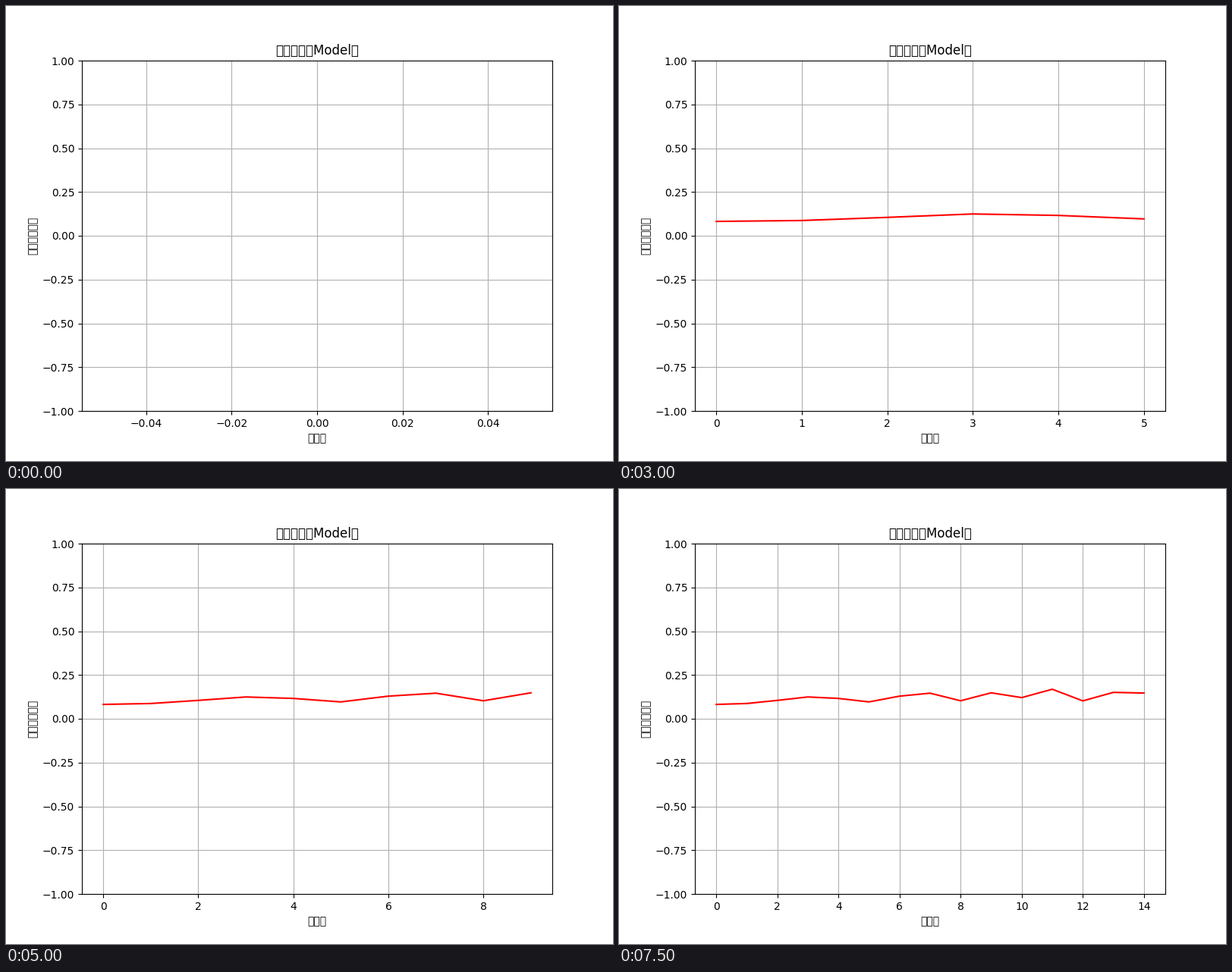
These frames come from a looping animation (800x600 px, 8 s). A matplotlib script:

```python
import matplotlib.pyplot as plt
import numpy as np
from matplotlib.animation import FuncAnimation

# The CJK labels have no glyphs in this font and show as empty boxes.
plt.rcParams["font.family"] = ["DejaVu Sans"]

STEP_MS = 500
FRAMES = 16


def score(n):
    """Slowly rising score whose swings get faster and larger."""
    trend = 0.094 + 0.0038 * n + 0.0009 * n * np.sin(np.pi * n / 11.3)
    cycles = 0.09 * n + 0.0203 * n**2
    swing = (0.012 + 0.0012 * n) * np.cos(2 * np.pi * cycles)
    ripple = 0.00105 * n * np.cos(np.pi / 2 * (n - 6.5))
    return trend - swing + ripple


fig, ax = plt.subplots(figsize=(8, 6), dpi=100)
line, = ax.plot([], [], color="red", lw=1.5)
ax.set_title("训练曲线（Model）")
ax.set_xlabel("回合数")
ax.set_ylabel("平均奖励数值")
ax.set_ylim(-1, 1)
ax.grid(True)


def update(count):
    """Show the first `count` scores and fit the x axis to them."""
    rounds = np.arange(count)
    line.set_data(rounds, score(rounds))
    last = max(count - 1, 0)
    pad = 0.05 * last or 0.055
    ax.set_xlim(-pad, last + pad)
    return line,


anim = FuncAnimation(fig, update, frames=FRAMES, interval=STEP_MS,
                     init_func=lambda: update(0), repeat=True,
                     repeat_delay=0, blit=False)
plt.show()
```
